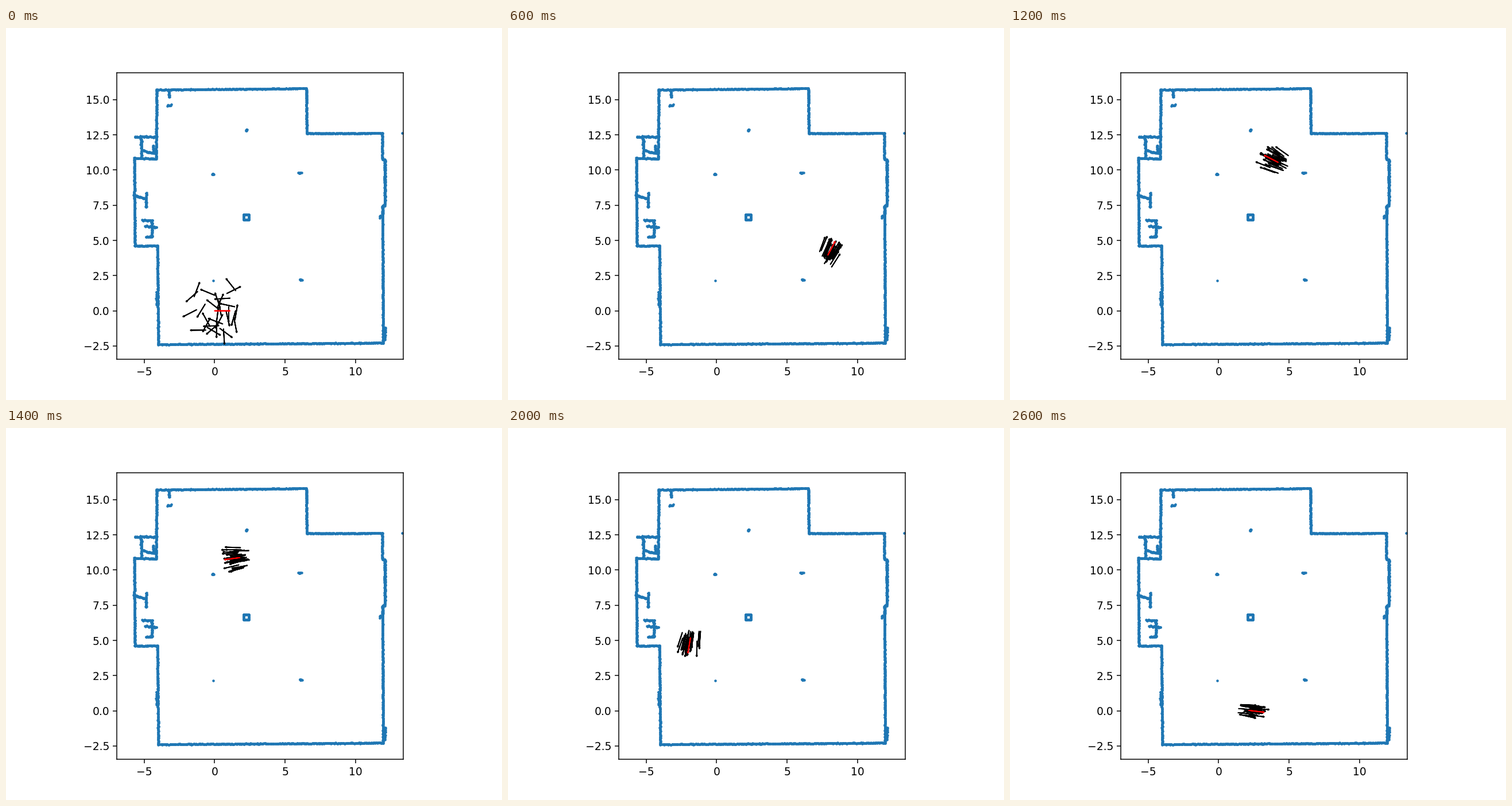
These frames come from a looping animation (864 px wide and 648 px high, 2700 ms). A matplotlib script:

```python
import numpy as np
import matplotlib.pyplot as plt
from matplotlib.animation import FuncAnimation

FRAMES = 27
PARTICLES = 30
BLUE = "#1f77b4"

# Hall corners in metres, clockwise from the top left
HALL = [
    (-4.11, 15.7), (6.52, 15.8), (6.55, 12.6), (11.91, 12.62), (11.91, 10.79),
    (12.1, 10.71), (12.1, 7.53), (11.93, 7.45), (11.97, -2.28), (-4, -2.39),
    (-4.06, 4.62), (-5.67, 4.62), (-5.7, 10.86), (-4.16, 10.8), (-4.11, 15.7),
]

# Furniture and rough spots on the walls, as short polylines
OBJECTS = [
    [(-5.69, 12.36), (-4.12, 12.36)],
    [(-5.21, 12.26), (-5.21, 10.87)],
    [(-5.11, 11.4), (-4.35, 11.2), (-4.38, 11.75)],
    [(-3.28, 15.65), (-3.24, 15.15)],
    [(-3.4, 14.6), (-3.1, 14.6)],
    [(-5.77, 8.22), (-4.91, 7.97)],
    [(-4.87, 8.39), (-4.87, 7.37)],
    [(-5.15, 6.43), (-4.46, 6.43), (-4.46, 5.28), (-4.9, 5.24)],
    [(-4.91, 6.02), (-4.15, 5.94)],
    [(12.1, 10.7), (12.1, 7.5)],
    [(12.1, -1.15), (12.08, -2.05)],
    [(-4.11, 1.33), (-4.11, .4)],
    [(11.76, 6.8), (11.76, 6.65)],
]
PILLARS = [(2.28, 12.84), (-.12, 9.69), (5.99, 9.8), (6.07, 2.2)]
SPECKS = [(-.1, 2.15), (13.32, 12.62)]
BASE = (2.245, 6.66)   # square stand in the middle of the hall

# Robot route: frame, x, y, heading in degrees
ROUTE = np.array([
    (0, 0, 0, 0), (3, 4.14, .45, 12.6), (8, 8.46, 7.6, 95),
    (12, 4.22, 10.55, 153), (17, -1.28, 8.83, 239), (22, -1.57, 2.6, 275),
    (24, .35, .25, 327), (26, 2.15, .03, 353),
])


def trace(points, rough, rng):
    """Dense, slightly scattered scan points along a polyline."""
    points = np.array(points)
    parts = []
    for a, b in zip(points, points[1:]):
        n = int(25 * np.hypot(*(b - a))) + 2
        noise = np.clip(rng.normal(size=(n, 2)), -2, 2)
        parts.append(np.linspace(a, b, n) + rough * noise)
    return np.vstack(parts)


def scan_map():
    rng = np.random.default_rng(4)
    corners = np.array([(-1, -1), (1, -1), (1, 1), (-1, 1), (-1, -1)])
    parts = [trace(HALL, .015, rng), trace(BASE + .185 * corners, .006, rng)]
    parts += [trace(line, .025, rng) for line in OBJECTS]
    parts += [rng.normal(p, (.06, .02), (8, 2)) for p in PILLARS]
    return np.vstack(parts + [SPECKS])


def direction(deg):
    a = np.radians(deg)
    return np.array([np.cos(a), np.sin(a)])


def robot_pose(frame):
    """Cubic path through the route, tangent to the heading at each stop."""
    i = min(np.searchsorted(ROUTE[:, 0], frame, side="right"), len(ROUTE) - 1)
    (f0, *p0, h0), (f1, *p1, h1) = ROUTE[i - 1], ROUTE[i]
    p0, p1 = np.array(p0), np.array(p1)
    t = (frame - f0) / (f1 - f0)
    # length of the arc that turns from one heading to the other
    half = np.radians(h1 - h0) / 2
    arc = np.hypot(*(p1 - p0)) * half / np.sin(half)
    pos = ((2 * t**3 - 3 * t**2 + 1) * p0 + (3 * t**2 - 2 * t**3) * p1
           + arc * (t**3 - 2 * t**2 + t) * direction(h0)
           + arc * (t**3 - t**2) * direction(h1))
    return pos, h0 + t * (h1 - h0)


def swarm(frame):
    """Tails and headings: random at first, then gathered round the robot."""
    rng = np.random.default_rng(100 + frame)
    if frame == 0:
        return (rng.uniform(-1.5, 1.5, (PARTICLES, 2)),
                rng.uniform(0, 360, PARTICLES))
    pos, heading = robot_pose(frame)
    z = np.clip(rng.normal(size=(3, PARTICLES)), -1.9, 1.9)
    ahead = -.2 + .28 * z[0]
    side = (.2 + .2 * np.sin(np.pi * frame / (FRAMES - 1))) * z[1]
    tails = (pos + np.outer(ahead, direction(heading))
             + np.outer(side, direction(heading + 90)))
    # particles on the left of the path point further left
    return tails, heading + 12 * side + 3 * z[2]


fig, ax = plt.subplots(figsize=(6.4, 4.8), dpi=135)
ax.set_aspect("equal")
ax.set_xlim(-6.937, 13.413)
ax.set_ylim(-3.43, 16.92)
ax.set_xticks([-5, 0, 5, 10])
ax.set_yticks(np.arange(-2.5, 15.1, 2.5))
ax.set_autoscale_on(False)
ax.scatter(*scan_map().T, s=5.8, color=BLUE, linewidths=0, zorder=1)

arrows = []


def add_arrow(tail, heading, color, zorder):
    arrows.append(ax.arrow(*tail, *direction(heading), head_width=.1,
                           head_length=.1, fc=color, ec=color, zorder=zorder))


def clear():
    while arrows:
        arrows.pop().remove()
    return []


def update(frame):
    clear()
    for tail, heading in zip(*swarm(frame)):
        add_arrow(tail, heading, "black", 2)
    add_arrow(*robot_pose(frame), "red", 2.2)
    return arrows


anim = FuncAnimation(fig, update, frames=FRAMES, init_func=clear,
                     interval=100, repeat=True, repeat_delay=0, blit=False)
plt.show()
```
